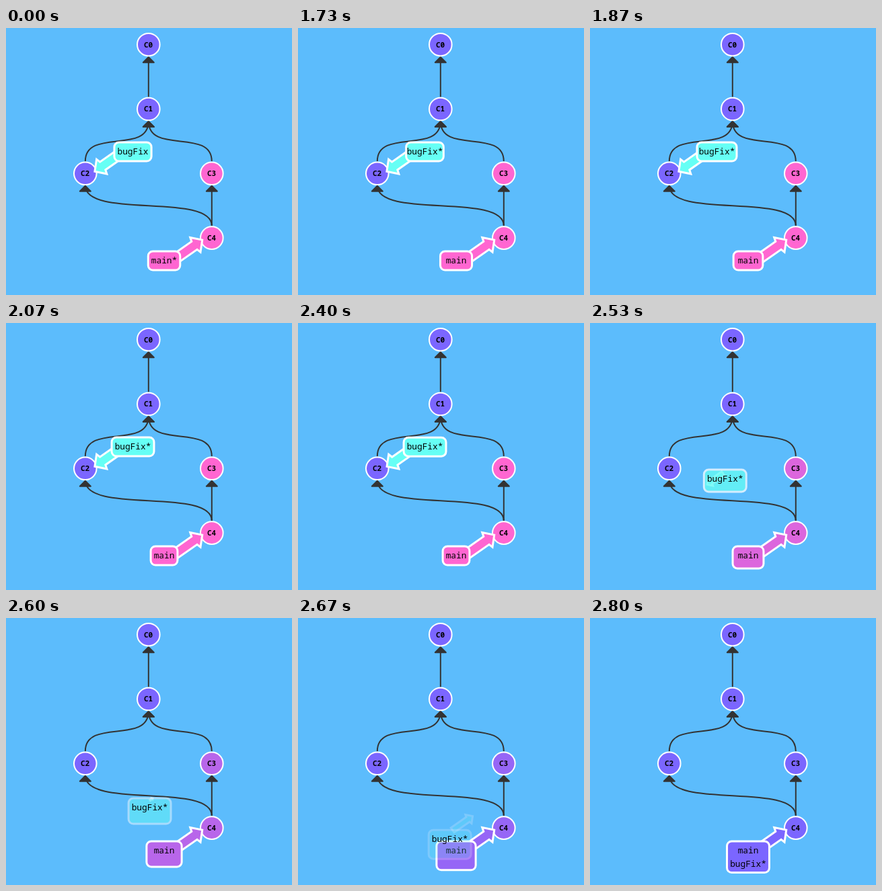
Recreate the animation shown at these times as an HTML page. Size 425 by 397 pixels, loop 2.87 s.

```html
<!DOCTYPE html>
<html lang="en">
<head>
<meta charset="utf-8">
<title>Branch move</title>
<style>
  html, body { margin: 0; width: 100%; height: 100%; overflow: hidden; background: #5cbcfc; }
  svg { display: block; width: 425px; height: 397px; }
  text { font-family: "Noto Sans Mono", "DejaVu Sans Mono", monospace; text-anchor: middle; fill: #000; }
  .node { stroke: #fff; stroke-width: 2; }
  .node-name { font-size: 11px; font-weight: 600; }
  .edge { fill: none; stroke: #333; stroke-width: 2; }
  .head { fill: #333; stroke: #333; stroke-width: 2; stroke-linejoin: round; }
  .tag { stroke: #fff; stroke-width: 3; }
  .tag-name { font-size: 12.8px; }
</style>
</head>
<body>
<svg id="stage" viewBox="0 0 425 397"></svg>
<script>
const LOOP = 2870, FPS = 15;
const SWITCH = 1730, RESIZE = 1668, MOVE = 2391, DURATION = 400;
const PURPLE = [123, 102, 255], PINK = [255, 102, 209], CYAN = [102, 255, 245];
const CHAR = 7.7, PAD = 9, LINE = 20, TAG_HEIGHT = 28, TALL = 46.5;
const RADIUS = 16.8, GAP = 18, BEND = 50;

const nodes = {
  C0: [211.8, 24.7], C1: [211.8, 120.5], C2: [117.8, 216.3],
  C3: [305.8, 216.3], C4: [305.8, 312.1]
};
const links = [["C1", "C0"], ["C2", "C1"], ["C3", "C1"], ["C4", "C2"], ["C4", "C3"]];

const stage = document.getElementById("stage");
const set = (el, attrs) => { for (const k in attrs) el.setAttribute(k, attrs[k]); };
function add(tag, attrs, text = "") {
  const el = document.createElementNS("http://www.w3.org/2000/svg", tag);
  set(el, attrs);
  el.textContent = text;
  return stage.appendChild(el);
}
const lerp = (a, b, p) => a + (b - a) * p;
const mix = (a, b, p) => a.map((v, i) => lerp(v, b[i], p));
const rgb = c => `rgb(${c.map(Math.round)})`;

// Cubic bezier (.42, 0, .58, 1)
function ease(x) {
  if (x <= 0) return 0;
  if (x >= 1) return 1;
  let lo = 0, hi = 1, u;
  for (let i = 0; i < 20; i++) {
    u = (lo + hi) / 2;
    const at = 1.26 * u * (1 - u) ** 2 + 1.74 * u * u * (1 - u) + u ** 3;
    if (at < x) lo = u; else hi = u;
  }
  return u * u * (3 - 2 * u);
}

// Arrow outline relative to its node: distances along and across the axis
const ANGLE = 35 * Math.PI / 180, TIP = [-14.1, 3];
const TAIL = 61, NECK = 14.4, BARB = 12.6, SHAFT_HALF = 7.2, HEAD_HALF = 13.3;
const outline = [
  [TAIL, -SHAFT_HALF], [NECK, -SHAFT_HALF], [BARB, -HEAD_HALF], [0, 0],
  [BARB, HEAD_HALF], [NECK, SHAFT_HALF], [TAIL, SHAFT_HALF]
].map(([back, side]) => [
  TIP[0] - back * Math.cos(ANGLE) + side * Math.sin(ANGLE),
  TIP[1] + back * Math.sin(ANGLE) + side * Math.cos(ANGLE)
]);
const arrowPoints = ([x, y], scale) => outline.map(([dx, dy]) => [x + dx * scale, y + dy * scale]).join(" ");

for (const [from, to] of links) {
  const [x1, y1] = nodes[from], [x2, y2] = nodes[to];
  const start = y1 - GAP, end = y2 + GAP;
  add("path", { class: "edge", d: `M${x1} ${start}C${x1} ${start - BEND} ${x2} ${end + BEND} ${x2} ${end}` });
  add("path", { class: "head", d: `M${x2} ${end + 0.5}l8 8h-16z` });
}

const circles = {};
for (const name in nodes) {
  const [cx, cy] = nodes[name];
  circles[name] = add("circle", { class: "node", cx, cy, r: RADIUS, fill: rgb(PURPLE) });
  add("text", { class: "node-name", x: cx - 0.3, y: cy + 3.8 }, name);
}

const makeTag = color => ({
  arrow: add("polygon", { class: "tag", fill: rgb(color) }),
  box: add("rect", { class: "tag", rx: 7, fill: rgb(color) }),
  name: add("text", { class: "tag-name" })
});
const main = makeTag(PINK), fix = makeTag(CYAN);

function placeTag(tag, text, [x, y], width, height) {
  set(tag.box, { x: x - width / 2, y: y - TAG_HEIGHT / 2, width, height });
  set(tag.name, { x, y: y + 4 });
  if (tag.name.textContent !== text) tag.name.textContent = text;
}
const widthOf = chars => chars * CHAR + PAD;

function draw(ms) {
  const t = Math.floor((ms + 4) * FPS / 1000) * 1000 / FPS;
  const switched = t >= SWITCH;
  const resize = ease((t - RESIZE) / DURATION);
  const move = ease((t - MOVE) / DURATION);
  const height = lerp(TAG_HEIGHT, TALL, move);

  const mainWidth = lerp(lerp(widthOf(5), widthOf(4), resize), widthOf(7), move);
  placeTag(main, switched ? "main" : "main*", [235, 346], mainWidth, height);
  set(main.arrow, { points: arrowPoints(nodes.C4, 1) });

  const fixWidth = lerp(widthOf(6), widthOf(7), resize);
  placeTag(fix, switched ? "bugFix*" : "bugFix", mix([188.5, 184], [235, 346 + LINE], move), fixWidth, height);
  set(fix.arrow, { points: arrowPoints(mix(nodes.C2, nodes.C4, move), lerp(-1, 1, move)), opacity: 1 - move });
  set(fix.box, { opacity: 1 - move });

  const fill = rgb(mix(PINK, PURPLE, move));
  for (const el of [circles.C3, circles.C4, main.arrow, main.box]) set(el, { fill });
}

const began = performance.now();
function tick() {
  draw((performance.now() - began) % LOOP);
  requestAnimationFrame(tick);
}
draw(0);
requestAnimationFrame(tick);
</script>
</body>
</html>
```
